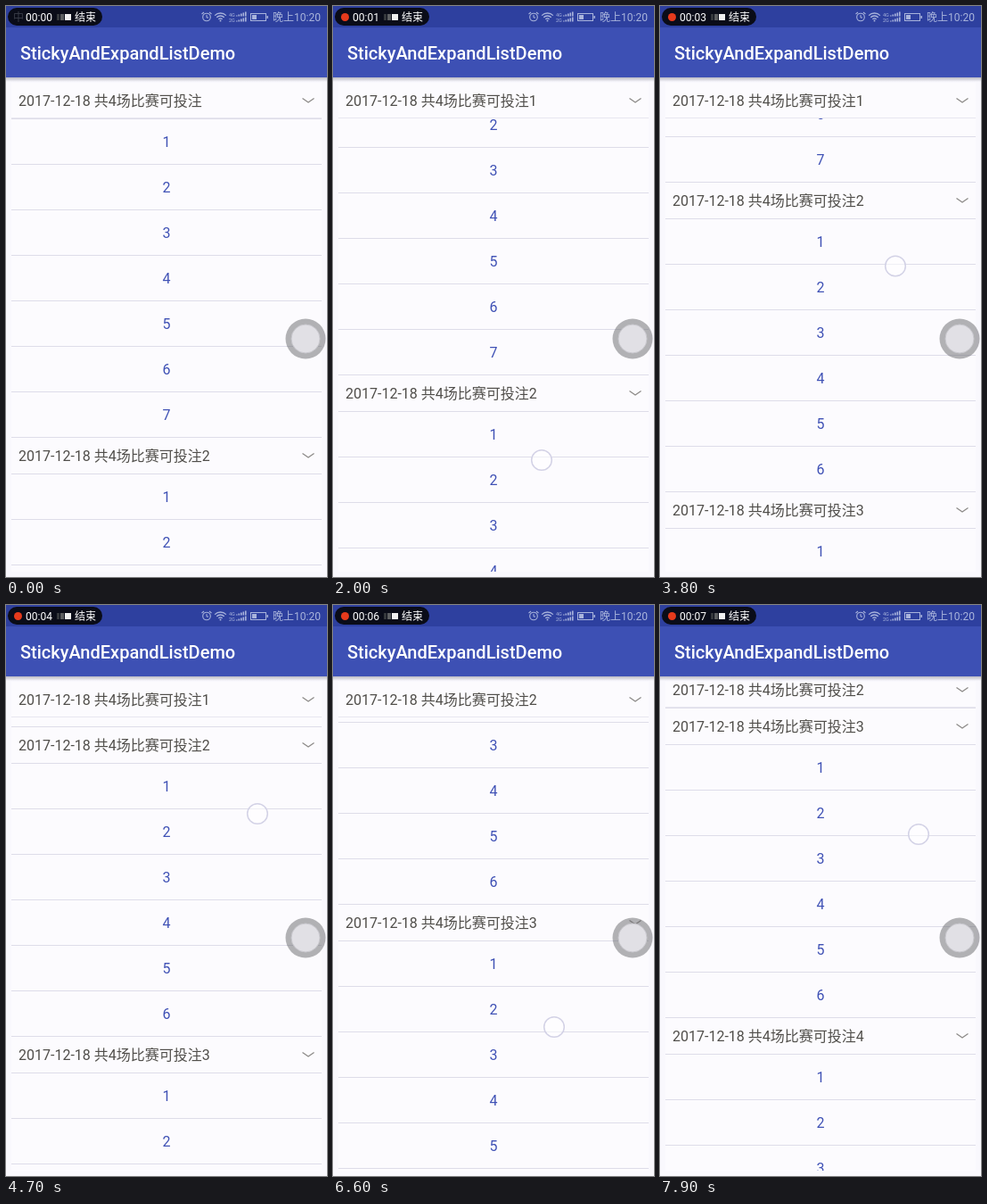
Recreate the animation shown at these times as an HTML page with a canvas. Size 360 px wide and 640 px high, loop 8000 ms.

```html
<!DOCTYPE html>
<html lang="zh">
<head>
<meta charset="utf-8">
<style>
  html, body { margin: 0; width: 100%; height: 100%; overflow: hidden; background: #f9f8fd; }
  canvas { display: block; width: 360px; height: 640px; }
</style>
</head>
<body>
<canvas id="stage" width="360" height="640"></canvas>
<script>
const ctx = document.getElementById('stage').getContext('2d');
const FONT = 'Roboto, "Noto Sans CJK SC", "Noto Sans CJK", sans-serif';
const LOOP = 8000, STEP = 100;
const LIST_TOP = 86, HEADER = 41, ROW = 51;
const STATUS_INK = '#a9b4dc', MARGIN = '#f9f8fd', PAPER = '#fcfbfe', LINE = '#dedde9';

// Each key is [ms, value, ...]
const scrollKeys = [[500, 0], [2000, 70], [2600, 163], [3800, 286], [4700, 347],
  [5200, 370], [5700, 381], [6600, 495], [7900, 715]];
const drags = [
  [[500, 222, 587], [2000, 234, 509], [2600, 246, 416], [3800, 264, 291.5], [4700, 282, 234], [5200, 289, 212]],
  [[5600, 230, 588], [6600, 248, 473], [7900, 290, 257]]
];

let nextTop = 85;
const groups = [7, 6, 6, 7].map((rows, i) => {
  const group = { rows, top: nextTop, number: i + 1 };
  nextTop += HEADER + rows * ROW;
  return group;
});

// Monotone cubic interpolation through one column of the keys
function along(keys, t, col = 1) {
  const last = keys.length - 1;
  if (t <= keys[0][0]) return keys[0][col];
  if (t >= keys[last][0]) return keys[last][col];
  const i = keys.findIndex(k => k[0] > t) - 1;
  const secant = j => (keys[j + 1][col] - keys[j][col]) / (keys[j + 1][0] - keys[j][0]);
  const tangent = j => {
    if (j === 0) return secant(0) / 2;
    if (j === last) return secant(last - 1);
    const a = secant(j - 1), b = secant(j);
    return a * b > 0 ? 2 * a * b / (a + b) : 0;
  };
  const span = keys[i + 1][0] - keys[i][0], u = (t - keys[i][0]) / span, v = 1 - u;
  return keys[i][col] * v * v * (1 + 2 * u) + keys[i + 1][col] * u * u * (3 - 2 * u)
    + span * u * v * (tangent(i) * v - tangent(i + 1) * u);
}

function rect(x, y, w, h, color) {
  ctx.fillStyle = color;
  ctx.fillRect(x, y, w, h);
}

function text(str, x, y, size, color, weight = 400, align = 'left') {
  ctx.font = `${weight} ${size}px ${FONT}`;
  ctx.textAlign = align;
  ctx.fillStyle = color;
  ctx.fillText(str, x, y);
}

function disc(x, y, r, color) {
  ctx.beginPath();
  ctx.arc(x, y, r, 0, 7);
  ctx.fillStyle = color;
  ctx.fill();
}

function arc(x, y, r, color, width, from = 0, to = Math.PI * 2) {
  ctx.beginPath();
  ctx.arc(x, y, r, from, to);
  ctx.strokeStyle = color;
  ctx.lineWidth = width;
  ctx.stroke();
}

function path(points, color, width) {
  ctx.beginPath();
  points.forEach(([x, y]) => ctx.lineTo(x, y));
  ctx.strokeStyle = color;
  ctx.lineWidth = width;
  ctx.stroke();
}

function header(top, number) {
  rect(6, top + 1, 348, HEADER - 1, PAPER);
  text('2017-12-18 共4场比赛可投注' + number, 14, top + 27, 16, '#504e4a');
  path([[332.5, top + 18.5], [339, top + 23], [345.5, top + 18.5]], '#8c8a88', 1.3);
}

function list(scroll) {
  ctx.save();
  ctx.beginPath();
  ctx.rect(5, LIST_TOP, 350, 548);
  ctx.clip();
  rect(6, LIST_TOP, 348, 548, PAPER);

  for (const { top, rows, number } of groups) {
    const y = Math.round(top - scroll);
    header(y, number);
    for (let i = 0; i <= rows; i++) {
      const rowTop = y + HEADER + i * ROW;
      rect(6, rowTop, 348, 1, LINE);
      if (i < rows) text(i + 1, 180, rowTop + 32, 16, '#3f51b5', 400, 'center');
    }
  }

  // The pinned header is pushed out by the next group
  const current = groups.filter(g => g.top - scroll <= 85).pop();
  const next = groups[current.number];
  const pinnedTop = Math.min(85, Math.round(next.top - scroll) - HEADER);
  header(pinnedTop, scroll > 0 ? current.number : '');
  rect(6, pinnedTop + HEADER - 1, 348, 1, '#e8e7f0');
  ctx.restore();
}

function statusBar(t) {
  rect(0, 0, 360, 24, '#2e409f');
  ctx.beginPath();
  ctx.roundRect(2, 2, 106, 20, 10);
  ctx.fillStyle = '#0a0c18';
  ctx.fill();
  if (t < 100) text('中', 8, 17, 12, '#3a3d48');
  else disc(13.5, 12.5, 4.5, '#e63a1c');
  const seconds = Math.max(0, Math.floor((t - 300) / 1000));
  text('00:0' + seconds, 22, 17, 12, '#fff');
  rect(57, 9, 3, 7, '#34373b');
  rect(61, 9, 4, 7, '#5c5e60');
  rect(66, 9, 7, 7, '#f0f0f0');
  text('结束', 77, 17, 12, '#fff');

  // Alarm, wifi, signal, battery
  arc(225, 12.5, 4.3, STATUS_INK, 1.1);
  path([[225, 10], [225, 13], [227, 13]], STATUS_INK, 1);
  path([[219.5, 9], [222, 7]], STATUS_INK, 1.1);
  path([[228, 7], [230.5, 9]], STATUS_INK, 1.1);
  for (const r of [3, 6, 9]) arc(240.5, 17, r, STATUS_INK, 1.3, -Math.PI * .75, -Math.PI * .25);
  disc(240.5, 16.5, 1, STATUS_INK);
  for (const [label, y] of [['4G', 11.5], ['2G', 17.5]]) {
    text(label, 250, y, 5.5, STATUS_INK);
    for (let i = 0; i < 5; i++) rect(258 + i * 2.5, y - 1 - i, 1.6, 1 + i, STATUS_INK);
  }
  ctx.strokeStyle = STATUS_INK;
  ctx.lineWidth = 1;
  ctx.strokeRect(274.5, 8.5, 17, 8);
  rect(276, 10, 5, 5, STATUS_INK);
  rect(292.5, 11, 1.5, 3, STATUS_INK);
  text('晚上10:20', 299, 17, 12, STATUS_INK);
}

function appBar() {
  rect(0, 24, 360, 56, '#3d50b4');
  text('StickyAndExpandListDemo', 16, 60, 20, '#fff', 500);
  const shade = ctx.createLinearGradient(0, 80, 0, 85);
  shade.addColorStop(0, 'rgba(70,70,90,.35)');
  shade.addColorStop(1, 'rgba(70,70,90,0)');
  rect(0, 80, 360, 5, shade);
}

function floatingButton() {
  disc(336, 373, 22.5, 'rgba(104,104,108,.5)');
  disc(336, 373, 16, '#e1e0e5');
  arc(336, 373, 16, '#c9c8ce', 1);
}

function touch(t) {
  const drag = drags.find(d => t >= d[0][0] && t <= d[d.length - 1][0]);
  if (!drag) return;
  const x = along(drag, t, 1), y = along(drag, t, 2);
  disc(x, y, 11.5, 'rgba(255,255,255,.55)');
  arc(x, y, 11.3, '#d3d2e6', 1.5);
}

function draw(now) {
  const t = Math.floor(now % LOOP / STEP) * STEP;
  rect(0, 0, 360, 640, MARGIN);
  list(along(scrollKeys, t));
  appBar();
  statusBar(t);
  floatingButton();
  touch(t);
  requestAnimationFrame(() => draw(performance.now() - start));
}

const start = performance.now();
draw(0);
</script>
</body>
</html>
```
